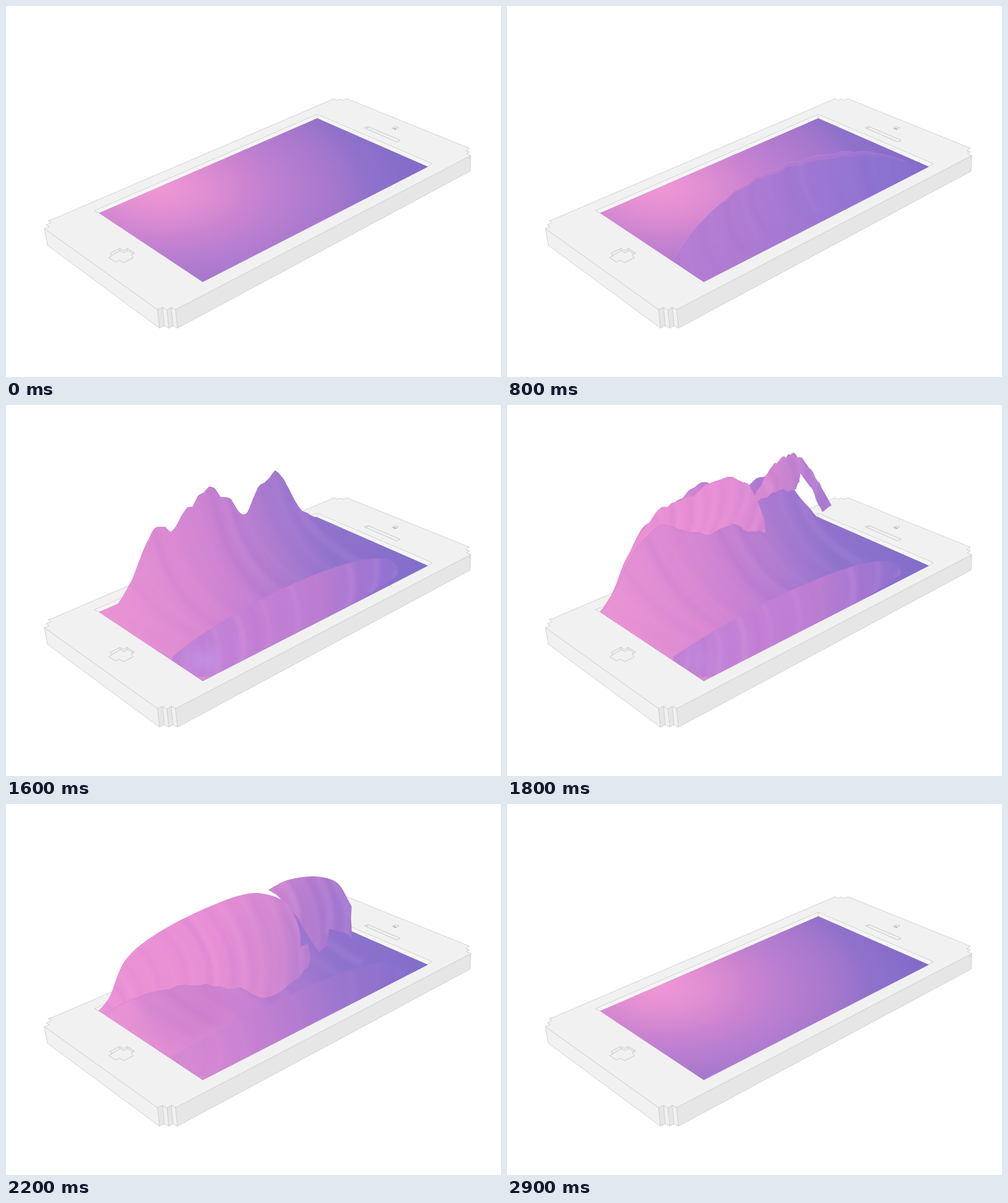
An HTML page that plays this animation: 800x600 px, repeating every 3100 ms.

```html
<!DOCTYPE html>
<html lang="en">
<head>
<meta charset="utf-8">
<title>Phone wave</title>
<style>
html, body { margin: 0; width: 100%; height: 100%; overflow: hidden; background: #fff; }
svg { display: block; width: 100vw; height: 100vh; }
.edge { stroke: #d2d2d2; stroke-width: 1; stroke-linejoin: round; }
.line { fill: none; }
</style>
</head>
<body>
<svg viewBox="0 0 800 600" xmlns="http://www.w3.org/2000/svg">
  <defs>
    <radialGradient id="screen" gradientUnits="userSpaceOnUse" cx="0" cy="0" r="1.7" gradientTransform="matrix(198 -86 167 111 246 294)">
      <stop offset="0" stop-color="#f097d5"/>
      <stop offset=".18" stop-color="#e08ed2"/>
      <stop offset=".35" stop-color="#c882d0"/>
      <stop offset=".5" stop-color="#b57dd0"/>
      <stop offset=".65" stop-color="#a577cd"/>
      <stop offset=".78" stop-color="#8f71ca"/>
      <stop offset="1" stop-color="#806bc7"/>
    </radialGradient>
    <linearGradient id="face" gradientUnits="userSpaceOnUse" x1="160" y1="310" x2="640" y2="166">
      <stop offset="0" stop-color="#ea94d4"/>
      <stop offset=".3" stop-color="#d888d2"/>
      <stop offset=".46" stop-color="#c280d1"/>
      <stop offset=".6" stop-color="#a87ad0"/>
      <stop offset=".74" stop-color="#9074cc"/>
      <stop offset="1" stop-color="#836ecb"/>
    </linearGradient>
    <linearGradient id="curl" gradientUnits="userSpaceOnUse" x1="150" y1="0" x2="620" y2="0">
      <stop offset="0" stop-color="#ec92d4"/>
      <stop offset=".4" stop-color="#e78fd5"/>
      <stop offset=".6" stop-color="#d388d1"/>
      <stop offset=".71" stop-color="#b67ed0"/>
      <stop offset=".82" stop-color="#a278d0"/>
      <stop offset="1" stop-color="#8d73d0"/>
    </linearGradient>
    <linearGradient id="swell" gradientUnits="userSpaceOnUse" x1="280" y1="0" x2="680" y2="0">
      <stop offset="0" stop-color="#b67ed3"/>
      <stop offset=".3" stop-color="#ac7bd2"/>
      <stop offset=".65" stop-color="#9676d2"/>
      <stop offset="1" stop-color="#836ecc"/>
    </linearGradient>
    <linearGradient id="roll" gradientUnits="userSpaceOnUse" x1="275" y1="0" x2="635" y2="0">
      <stop offset="0" stop-color="#c084d6"/>
      <stop offset=".35" stop-color="#c481d4"/>
      <stop offset=".62" stop-color="#bc7dd1"/>
      <stop offset=".8" stop-color="#a879d2"/>
      <stop offset="1" stop-color="#8c71d0"/>
    </linearGradient>
    <filter id="soft" filterUnits="userSpaceOnUse" x="0" y="0" width="800" height="600"><feGaussianBlur stdDeviation="2.5"/></filter>
    <filter id="haze" filterUnits="userSpaceOnUse" x="0" y="0" width="800" height="600"><feGaussianBlur stdDeviation="12"/></filter>
    <clipPath id="glass"><path d="M151 335 503 182 681 260 318 446Z"/></clipPath>
  </defs>
  <rect width="800" height="600" fill="#fff"/>
  <g id="phone">
    <path class="edge" fill="#f1f1f1" d="M62 360 245 491 248 521 67 387Z"/>
    <path class="edge" fill="#e6e6e6" d="M274 491 751 242 750 267 277 521Z"/>
    <path class="edge" fill="#e6e6e6" d="M245 491 253 487 256 517 248 521ZM260 492 267 487 270 517 263 521Z"/>
    <path class="edge" fill="#f1f1f1" d="M253 487 260 492 263 521 256 517ZM267 487 274 491 277 521 270 517Z"/>
    <path class="edge" fill="#e6e6e6" d="M743 234 749 236 743 239 751 242 750 247 745 244Z"/>
    <path class="edge" fill="#f1f1f1" d="M75 345 530 150 535 152.500 540 150.500 545 152.500 551 150 749 230 743 234 749 236 744 239 751 242 274 491 267 487 260 492 253 487 245 491 62 360 70 357 65 354 73 350 68 347Z"/>
    <path class="edge" fill="#f5f5f5" d="M151 335 143 331 503 175 689 255 681 260 503 182Z"/>
    <path class="edge line" d="M503 175V182"/>
    <g class="line" stroke="#c8c8c8">
      <path d="M184 392 190 395.500 196 392 208 399.500 202 403 206 407 190 415 183 411 177 414 166 407 172 403.500 168 400Z"/>
      <path d="M170 404 185 395.500 190 399 197 395.500 206 401M184 392V396M196 392V396"/>
      <path d="M579 197 585 195 637 217 632 220ZM583 199 585 195"/>
      <path d="M624 198 629 195 635 197 630 200Z"/>
    </g>
    <path d="M626 198 629 197.500 631 199 629 200Z" fill="#aaa"/>
  </g>
  <g id="stage"></g>
</svg>
<script>
const NS = 'http://www.w3.org/2000/svg', COUNT = 120, LOOP = 3100, STEP = 100;
const stage = document.getElementById('stage');
const defs = document.querySelector('defs');

function add(parent, tag, attrs = {}) {
  const el = document.createElementNS(NS, tag);
  for (const k in attrs) el.setAttribute(k, attrs[k]);
  return parent.appendChild(el);
}

let seed = 7;
const rnd = () => (seed = seed * 16807 % 2147483647) / 2147483647;
const mix = (a, b, k) => a + (b - a) * k;
const blend = (a, b, k) => a.map((p, i) => [mix(p[0], b[i][0], k), mix(p[1], b[i][1], k)]);
const ramp = (t, a, b) => Math.min(1, Math.max(0, (t - a) / (b - a)));
const pulse = (a, b, c, d, top = 1) => t => top * ramp(t, a, b) * (1 - ramp(t, c, d));
const each = fn => Array.from({ length: COUNT }, (_, i) => fn(i / (COUNT - 1), i));
const path = pts => 'M' + pts.map(p => p[0].toFixed(1) + ' ' + p[1].toFixed(1)).join(' ');

// Torn edge: random teeth, three samples wide
const teeth = Array.from({ length: COUNT }, () => rnd() * 2 - 1);
const jag = i => mix(teeth[Math.floor(i / 3)], teeth[Math.floor(i / 3) + 1], i % 3 / 3);
const tear = (pts, size) => pts.map(([x, y], i) => [x, y + size * jag(i) * Math.sin(Math.PI * i / (COUNT - 1))]);

function parse(text) {
  const n = text.match(/\d+/g).map(Number);
  return n.filter((_, i) => i % 2 === 0).map((x, i) => [x, n[2 * i + 1]]);
}
function cubic(a, b, c, d, s) {
  return b + s / 2 * (c - a + s * (2 * a - 5 * b + 4 * c - d + s * (3 * (b - c) + d - a)));
}
function sample(list, s) {
  const last = list.length - 1, f = s * last, i = Math.min(Math.floor(f), last - 1);
  return cubic(list[Math.max(i - 1, 0)], list[i], list[i + 1], list[Math.min(i + 2, last)], f - i);
}

// Line through key points, spaced evenly so that rows can be blended
function along(p) {
  const len = [0];
  for (let i = 1; i < p.length; i++) len.push(len[i - 1] + Math.hypot(p[i][0] - p[i - 1][0], p[i][1] - p[i - 1][1]));
  let j = 1;
  return each(s => {
    const want = s * len[len.length - 1];
    while (j < p.length - 1 && len[j] < want) j++;
    const k = (want - len[j - 1]) / (len[j] - len[j - 1]);
    return [mix(p[j - 1][0], p[j][0], k), mix(p[j - 1][1], p[j][1], k)];
  });
}
const sharp = text => along(parse(text));
function smooth(text) {
  const p = parse(text), xs = p.map(q => q[0]), ys = p.map(q => q[1]);
  return along(each(s => [sample(xs, s), sample(ys, s)]));
}
function bezier(text) {
  const p = parse(text);
  const axis = (k, s) => (1 - s) ** 3 * p[0][k] + 3 * s * (1 - s) ** 2 * p[1][k] + 3 * s * s * (1 - s) * p[2][k] + s ** 3 * p[3][k];
  return along(each(s => [axis(0, s), axis(1, s)]));
}

function ribs(parent, n, id, light, dark, power) {
  const clip = add(add(defs, 'clipPath', { id }), 'path');
  const g = add(add(parent, 'g', { 'clip-path': `url(#${id})` }), 'g', { filter: 'url(#soft)', fill: 'none' });
  const list = Array.from({ length: n }, (_, i) => ({
    at: Math.round((i + .2 + rnd() * .6) / n * (COUNT - 1)),
    el: add(g, 'path', {
      stroke: i % 2 ? light : dark,
      'stroke-width': 3 + rnd() * 9,
      'stroke-opacity': power * (.3 + rnd() * .7)
    })
  }));
  return (d, bend) => {
    clip.setAttribute('d', d);
    for (const r of list) {
      const [a, b, c] = bend(r.at);
      r.el.setAttribute('d', path([a]) + 'Q' + path([b, c]).slice(1));
    }
  };
}

function sheet(parent, id, fill, crest, tip, alpha, count) {
  const g = add(parent, 'g');
  const body = add(g, 'path', { fill: `url(#${fill})` });
  const lines = ribs(g, count, id, '#f5b4ea', '#a15fc0', .14);
  const rim = add(g, 'path', { fill: 'none', stroke: '#b06cc4', 'stroke-opacity': .3 });
  return t => {
    const c = crest(t), e = tip(t), d = path([...c, ...[...e].reverse()]) + 'Z';
    g.setAttribute('opacity', alpha(t));
    body.setAttribute('d', d);
    rim.setAttribute('d', path(e));
    lines(d, i => {
      const [a, b] = [c[i], e[i]], dx = b[0] - a[0], dy = b[1] - a[1];
      return [a, [a[0] + dx / 2 + dy * .2, a[1] + dy / 2 - dx * .2], b];
    });
  };
}

function patch(parent, attrs, alpha) {
  const el = add(parent, 'path', attrs);
  return t => el.setAttribute('opacity', alpha(t));
}

// Big wave: it rises from the back edge, curls over and lands
const heights = [0, 0, 40, 93, 83, 108, 120, 95, 54, 93, 95, 30, 0];
const edge = u => [151 + 352 * u, 335 - 153 * u];
function risen(from, to) {
  return t => {
    const grow = ramp(t, 1100, 1600) ** 2;
    return each((s, i) => {
      const u = mix(from, to, s), [x, y] = edge(u), h = Math.max(0, sample(heights, u));
      return [x, y - grow * (h + 7 * jag(i) * Math.min(1, h / 40))];
    });
  };
}
function bigRow(from, to, curled, landed, power) {
  const rise = risen(from, to);
  return t => {
    if (t > 2000) return blend(curled, landed, ramp(t, 2000, 2450) ** power);
    const k = ramp(t, 1600, 2000), lift = 24 * Math.sin(Math.PI * k);
    return blend(rise(t), curled, k).map(([x, y], i) => [x, y - lift * Math.sin(Math.PI * i / (COUNT - 1))]);
  };
}
const SPLIT = .64;
const ridge = bigRow(0, 1,
  smooth('151,335 184,250 240,200 330,155 430,140 480,155 500,180 506,183'),
  each(edge), 1);
const mainCrest = bigRow(0, SPLIT,
  smooth('148,335 165,310 184,240 238,190 325,145 395,126 448,150 464,205 460,240'),
  sharp('151,335 503,182 540,198'), 2);
const mainTip = bigRow(0, SPLIT,
  tear(smooth('158,332 190,252 225,228 262,230 325,268 350,305 405,274 430,279 460,240'), 5),
  smooth('168,347 270,412 318,430 372,419 500,354 608,294 612,255 582,211 540,197'), 1.3);
const sideCrest = bigRow(SPLIT, 1,
  smooth('405,128 440,106 490,97 528,108 546,142'),
  smooth('500,184 540,198 582,211'), 2);
const sideTip = bigRow(SPLIT, 1,
  sharp('405,128 452,155 500,210 508,185 495,147 520,162 538,198 541,162 546,142'),
  smooth('500,184 520,300 600,290 582,211'), 1.3);

function risingFace() {
  const g = add(stage, 'g');
  const base = add(g, 'path', { fill: 'url(#screen)', stroke: 'url(#screen)' });
  const top = add(g, 'g');
  const tint = add(top, 'path', { fill: 'url(#face)' });
  const lines = ribs(top, 17, 'faceClip', '#eba3e4', '#9157bd', .1);
  const alpha = pulse(1150, 1500, 2250, 2850);
  return t => {
    const c = ridge(t), d = path(c) + 'L503 182 681 260 318 446 151 335Z';
    base.setAttribute('d', d);
    tint.setAttribute('d', d);
    top.setAttribute('opacity', alpha(t));
    lines(d, i => {
      const [x, y] = edge(i / (COUNT - 1));
      return [c[i], [x + 25, y + 20], [x + 105, y + 62]];
    });
  };
}

// Small wave in front: flat, ridge, roll, bump, then a trace, 400 ms apart
function lowRow(...poses) {
  return t => {
    const i = Math.min(Math.floor(t / 400), poses.length - 1);
    const f = Math.min(1, i === 0 ? t / 800 : t / 400 - i);
    if (t < 800) return blend(poses[0], poses[1], t / 800);
    const j = Math.min(i - 1, poses.length - 2);
    return blend(poses[j], poses[j + 1], i > poses.length - 1 ? 1 : f);
  };
}
const flat = bezier('270,413 395,355 520,290 645,252');
const lowCrest = lowRow(flat,
  tear(bezier('270,411 333,285 515,198 645,252'), 3),
  bezier('275,405 370,300 585,200 621,252'),
  bezier('268,408 370,318 645,192 633,275'),
  bezier('268,408 380,345 640,205 640,275'));
const lowTip = lowRow(flat,
  tear(bezier('270,411 330,292 500,216 645,252'), 3),
  tear(smooth('290,418 305,390 362,395 430,355 510,325 590,284 621,252'), 4),
  bezier('268,413 310,500 520,350 633,275'),
  bezier('268,413 310,500 520,350 640,275'));

function swell(parent) {
  const g = add(parent, 'g');
  const body = add(g, 'path', { fill: 'url(#swell)' });
  const lines = ribs(g, 15, 'swellClip', '#b795ea', '#8858bb', .13);
  const rim = add(g, 'path', { fill: 'none', stroke: '#d59be4', 'stroke-opacity': .3, 'stroke-width': 1.500 });
  const alpha = pulse(0, 700, 900, 1600, .95);
  return t => {
    const c = lowCrest(t), d = path(c) + 'L681 260 318 446Z';
    g.setAttribute('opacity', alpha(t));
    body.setAttribute('d', d);
    rim.setAttribute('d', path(c));
    lines(d, i => {
      const [x, y] = c[i];
      return [c[i], [x - 8, y + 35], [x + 25, y + 85]];
    });
  };
}

const layer = () => add(stage, 'g', { 'clip-path': 'url(#glass)' });
const over = pulse(1600, 1700, 2500, 2900);
const face = risingFace();
const tube = patch(stage, {
  d: 'M205 262Q220 228 270 236Q330 265 352 320Q345 360 300 384Q245 390 215 335Z',
  fill: '#ac6cc4', filter: 'url(#haze)'
}, pulse(1800, 2000, 2000, 2400, .38));
const low = layer();
const lowParts = [
  swell(low),
  sheet(low, 'rollClip', 'roll', lowCrest, lowTip, pulse(700, 900, 1800, 2400), 18),
  patch(low, {
    d: 'M290 418Q288 400 307 390Q332 380 362 396L340 418 318 434Z',
    fill: '#a670c8', filter: 'url(#soft)'
  }, pulse(1000, 1200, 1200, 1450, .65)),
  patch(low, {
    d: 'M292 420Q288 400 307 390Q326 382 350 388',
    fill: 'none', stroke: '#d2a0ea', 'stroke-width': 4, filter: 'url(#soft)'
  }, pulse(1000, 1200, 1200, 1450, .9)),
  patch(low, {
    d: 'M290 412Q315 390 345 402Q345 424 318 433Z',
    fill: '#c59ae6', filter: 'url(#haze)'
  }, pulse(1300, 1600, 1600, 1900, .7))
];
const parts = [
  face, tube, ...lowParts,
  sheet(stage, 'sideClip', 'curl', sideCrest, sideTip, over, 10),
  sheet(stage, 'mainClip', 'curl', mainCrest, mainTip, over, 24),
  patch(layer(), {
    d: 'M228 350Q285 335 325 375Q330 410 300 412Q255 395 228 350Z',
    fill: '#dfaae6', filter: 'url(#haze)'
  }, pulse(2250, 2500, 2500, 2800, .75))
];

const start = performance.now();
let shown = -1;
function draw(now) {
  const t = Math.floor(Math.max(0, now - start) % LOOP / STEP) * STEP;
  if (t !== shown) {
    shown = t;
    for (const part of parts) part(t);
  }
  requestAnimationFrame(draw);
}
draw(start);
</script>
</body>
</html>
```
